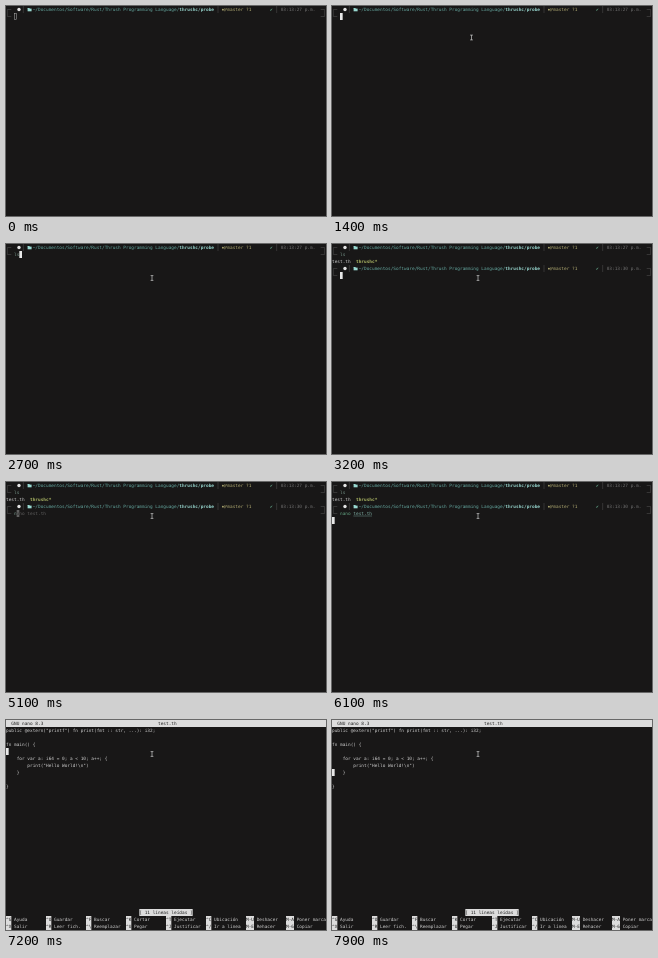
Animation of 320x210 px, one loop 8 s. Source, as an HTML page with a canvas:

```html
<!DOCTYPE html>
<html lang="es">
<head>
<meta charset="utf-8">
<title>Terminal</title>
<style>
html, body { margin: 0; width: 100%; height: 100%; overflow: hidden; background: #181717; }
canvas { display: block; width: 320px; height: 210px; }
</style>
</head>
<body>
<canvas id="stage"></canvas>
<script>
const WIDTH = 320, HEIGHT = 210, LOOP = 8000;
const CELL_W = WIDTH / 120, CELL_H = 7;
const C = {
  bg: '#181717', text: '#d0d0d0', light: '#dcdcdc', frame: '#626262', dim: '#727272', hint: '#606060',
  path: '#66aaa2', bold: '#98d8d0', git: '#b4ae74', ok: '#68ae90', exec: '#b2be68',
  typed: '#7a9a8e', cursor: '#e8e8e8'
};

const canvas = document.getElementById('stage');
const scale = window.devicePixelRatio || 1;
canvas.width = WIDTH * scale;
canvas.height = HEIGHT * scale;
const ctx = canvas.getContext('2d');
ctx.scale(scale, scale);

function rect(x, y, w, h, color) {
  ctx.fillStyle = color;
  ctx.fillRect(x, y, w, h);
}

// Every character sits in its own terminal cell.
function write(col, row, text, color = C.text, bold = false) {
  ctx.font = `${bold ? 'bold ' : ''}4.43px "DejaVu Sans Mono", monospace`;
  ctx.textRendering = 'geometricPrecision';
  ctx.fillStyle = color;
  [...text].forEach((ch, i) => {
    if (ch !== ' ') ctx.fillText(ch, (col + i) * CELL_W, row * CELL_H + 5.1);
  });
}

function inverse(col, row, text) {
  rect(col * CELL_W, row * CELL_H, text.length * CELL_W, CELL_H, C.light);
  write(col, row, text, '#202020');
}

function cursor(col, row, under = '', color = C.cursor) {
  rect(col * CELL_W, row * CELL_H, CELL_W, CELL_H, color);
  write(col, row, under, '#333');
}

function stroke(color, width, points) {
  ctx.strokeStyle = color;
  ctx.lineWidth = width;
  ctx.beginPath();
  points.forEach(([x, y], i) => i ? ctx.lineTo(x, y) : ctx.moveTo(x, y));
  ctx.stroke();
}

function dot(x, y, r, color) {
  ctx.fillStyle = color;
  ctx.beginPath();
  ctx.arc(x, y, r, 0, 7);
  ctx.fill();
}

function prompt(row, time) {
  const y = row * CELL_H, mid = y + 3.5;
  for (const [edge, inner] of [[1.4, 5.3], [318.6, 314.7]])
    stroke(C.frame, 0.4, [[inner, mid], [edge, mid], [edge, mid + CELL_H], [inner, mid + CELL_H]]);
  for (const col of [6, 79, 101]) {
    const x = (col + 0.5) * CELL_W;
    stroke(C.frame, 0.4, [[x, y], [x, y + CELL_H]]);
  }
  dot(13, mid, 1.7, '#e4e4e4');

  rect(21.6, y + 2, 2, 1, C.bold);
  rect(21.6, y + 2.6, 4, 2.7, C.bold);
  write(10, row, '~/Documentos/Software/Rust/Thrush Programming Language/', C.path);
  write(65, row, 'thrushc/probe', C.bold, true);

  dot(216.9, mid + 0.2, 0.9, C.git);
  stroke(C.git, 0.5, [[218.8, y + 5.4], [218.8, y + 2]]);
  stroke(C.git, 0.5, [[218.8, y + 4.3], [220.3, y + 3.5], [220.3, y + 2]]);
  write(83, row, 'master', C.git);
  write(90, row, '?1', C.git);
  write(99, row, '✔', C.ok);
  write(103, row, time + ' p.m.', C.dim);
}

function shell(t) {
  prompt(0, '03:13:27');
  if (t < 1200) {
    ctx.strokeStyle = '#b4b4b4';
    ctx.lineWidth = 0.5;
    ctx.strokeRect(8.4, 7.4, 2.1, 6.2);
    return;
  }
  const listed = 'ls'.slice(0, (t >= 2500) + (t >= 2600));
  write(3, 1, listed, C.typed);
  if (t < 2900) return cursor(3 + listed.length, 1);

  write(0, 2, 'test.th');
  write(9, 2, 'thrushc*', C.exec, true);
  prompt(3, t < 3200 ? '03:13:29' : '03:13:30');

  const command = 'nano test.th';
  if (t < 5100) return cursor(3, 4);
  if (t < 5800) {
    const typed = 1 + (t >= 5200) + (t >= 5400);
    write(3, 4, command.slice(0, typed), C.typed);
    write(3 + typed, 4, command.slice(typed), C.hint);
    // The cursor takes the colour of the suggested text beneath it.
    return cursor(3 + typed, 4, command[typed], C.hint);
  }
  write(3, 4, 'nano', '#62a482');
  write(8, 4, 'test.th', '#80b2a8');
  rect(8 * CELL_W, 33.8, 7 * CELL_W, 0.4, '#80b2a8');
  if (t < 6100) cursor(15, 4);
  else cursor(0, 5);
}

const code = [
  'public @extern("printf") fn print(fmt :: str, ...): i32;',
  '',
  'fn main() {',
  '',
  '    for var a: i64 = 0; a < 10; a++; {',
  '        print("Hello World!\\n")',
  '    }',
  '',
  '}'
];
const shortcuts = [
  ['^G Ayuda', '^X Salir'], ['^O Guardar', '^R Leer fich.'],
  ['^F Buscar', '^\\ Reemplazar'], ['^K Cortar', '^U Pegar'],
  ['^T Ejecutar', '^J Justificar'], ['^C Ubicación', '^/ Ir a línea'],
  ['M-U Deshacer', 'M-E Rehacer'], ['M-A Poner marca', 'M-6 Copiar']
];
const downPresses = [6800, 7000, 7200, 7400, 7600, 7900];

function editor(t) {
  rect(0, 0, WIDTH, CELL_H, C.light);
  write(2, 0, 'GNU nano 8.3', '#202020');
  write(57, 0, 'test.th', '#202020');
  code.forEach((line, i) => write(0, i + 1, line));

  const row = 1 + downPresses.filter(press => t >= press).length;
  cursor(0, row, code[row - 1].charAt(0));

  inverse(50, 27, '[ 11 líneas leídas ]');
  shortcuts.forEach((pair, i) => pair.forEach((label, j) => {
    const split = label.indexOf(' ');
    inverse(i * 15, 28 + j, label.slice(0, split));
    write(i * 15 + split + 1, 28 + j, label.slice(split + 1));
  }));
}

function pointer(t) {
  if (t < 1200) return;
  const step = Math.min(Math.floor(t / 100) * 100, 1900);
  const p = (step - 1400) / 500;
  const x = 139.5 + 6.5 * p, y = 31.5 + 2.5 * p;
  const beam = [
    [[x - 1.4, y - 2.4], [x + 1.4, y - 2.4]],
    [[x, y - 2.4], [x, y + 2.4]],
    [[x - 1.4, y + 2.4], [x + 1.4, y + 2.4]]
  ];
  beam.forEach(line => stroke('#111', 1.4, line));
  beam.forEach(line => stroke('#d0d0d0', 0.7, line));
}

const start = performance.now();
function draw() {
  const t = (performance.now() - start) % LOOP;
  rect(0, 0, WIDTH, HEIGHT, C.bg);
  (t < 6200 ? shell : editor)(t);
  pointer(t);
  requestAnimationFrame(draw);
}
draw();
</script>
</body>
</html>
```
